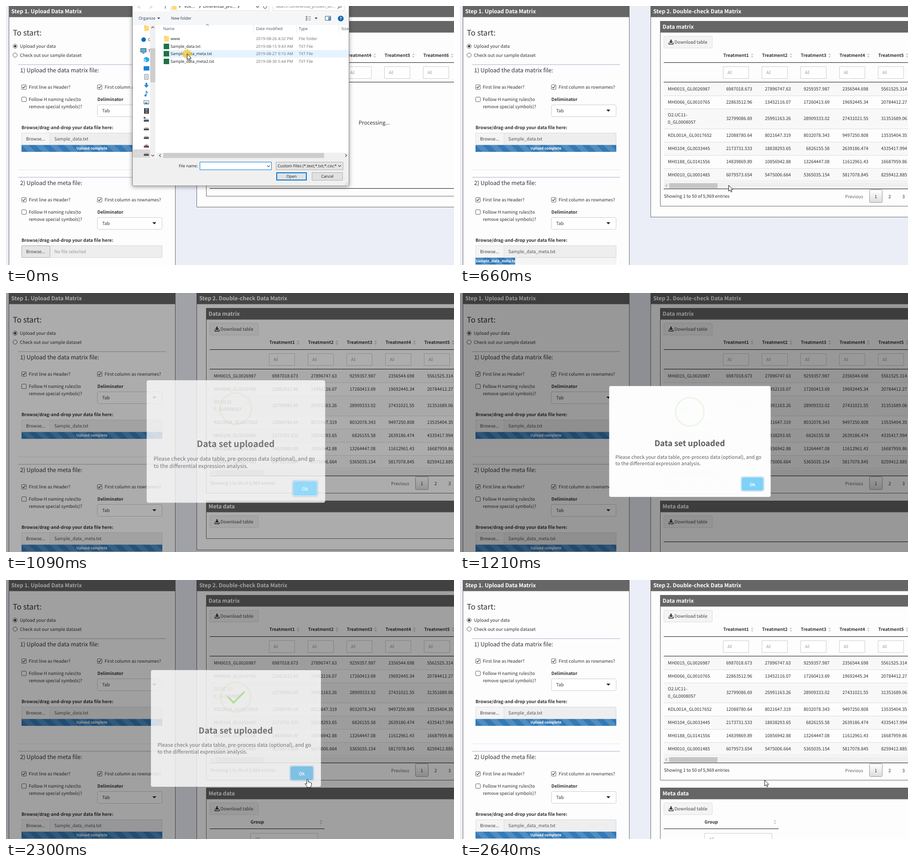
These frames come from a looping animation (983x570 px, 2.73 s). An HTML page with a canvas:

```html
<!DOCTYPE html>
<html lang="en">
<head>
<meta charset="utf-8">
<title>Data upload</title>
<style>
html, body { margin: 0; width: 100%; height: 100%; overflow: hidden; background: #ebeef6; }
canvas { display: block; }
</style>
</head>
<body>
<canvas id="stage" width="983" height="570"></canvas>
<script>
const W = 983, H = 570, LOOP = 2730;
const c = document.getElementById('stage').getContext('2d');
const SANS = '"Noto Sans CJK JP", "Noto Sans CJK SC", "Noto Sans CJK KR", "Noto Sans", sans-serif';
const UI = '"Open Sans", "Noto Sans", sans-serif';
const BODY = 9.8, BOLD = 9.72, TITLE = 11.9;
const BAR = '#666', INK = '#333', PAGE = '#ebeef6', BLUE = '#0078d7';

// The picture only changes at these moments.
const STEPS = [0, 100, 210, 330, 540, 660, 760, 870, 990, 1090, 1210, 1310,
  1430, 1550, 1650, 1760, 1870, 2300, 2410, 2520, 2640];

// time, x, y, shape
const POINTER = [
  [0, 397, 105, 'arrow'], [540, 500, 260, 'arrow'], [660, 589, 394, 'arrow'],
  [760, 650, 455, 'arrow'], [870, 705, 520, 'arrow'], [990, 0, 0, ''],
  [1650, 758, 522, 'arrow'], [1760, 706, 480, 'arrow'],
  [1870, 661, 438, 'hand'], [2640, 668, 440, 'arrow']
];

// time, shade, modal opacity, modal scale
const MODAL = [
  [0, 0, 0, 1], [1090, .32, .78, 1.05], [1210, .4, .98, .95], [1310, .4, 1, 1],
  [2300, .37, .8, 1], [2410, .3, .42, 1], [2520, .1, .08, 1], [2640, 0, 0, 1]
];

const ROWS = [
  ['MH0015_GL0026987', '6987018.673 27896747.63 9259357.987 2356544.698 5561525.314'],
  ['MH0066_GL0010765', '22863512.96 13452116.07 17260413.69 19692445.34 20784412.27'],
  ['O2.UC11-|0_GL0008057', '32799086.69 25991163.26 28909333.02 27431021.55 31351689.06'],
  ['KDL001A_GL0017652', '12088780.64 8021647.319 8032078.343 9497250.808 13535404.35'],
  ['MH0104_GL0033445', '2173731.533 18838293.65 6826155.58 2639186.474 4335417.994'],
  ['MH0188_GL0141556', '14839869.89 10856942.88 13264447.08 11612961.43 16687959.86'],
  ['MH0010_GL0001485', '6079573.654 5475006.664 5365035.154 5817078.845 8259412.885']
];

const latest = (list, t) => list.filter(k => k[0] <= t).pop();

// Baselines sit on whole pixels so that glyphs stay crisp.
function text(s, x, y, { size = BODY, bold = false, color = INK, align = 'left', font = SANS } = {}) {
  c.font = `${bold ? 700 : 400} ${size}px ${font}`;
  c.textAlign = align;
  c.fillStyle = color;
  c.fillText(s, x, Math.round(y));
}

function rect(x, y, w, h, fill) {
  c.fillStyle = fill;
  c.fillRect(x, y, w, h);
}

function box(x, y, w, h, fill, stroke, r = 0, line = 1) {
  c.beginPath();
  c.roundRect(x + line / 2, y + line / 2, w - line, h - line, r);
  c.fillStyle = fill;
  c.fill();
  if (stroke) {
    c.strokeStyle = stroke;
    c.lineWidth = line;
    c.stroke();
  }
}

function shape(points, fill, stroke, line = 1) {
  c.beginPath();
  points.forEach(([x, y]) => c.lineTo(x, y));
  c.closePath();
  if (fill) { c.fillStyle = fill; c.fill(); }
  if (stroke) { c.strokeStyle = stroke; c.lineWidth = line; c.stroke(); }
}

function path(points, color, line = 1) {
  c.beginPath();
  points.forEach(([x, y]) => c.lineTo(x, y));
  c.strokeStyle = color;
  c.lineWidth = line;
  c.stroke();
}

function disc(x, y, r, fill, stroke, line = 1) {
  c.beginPath();
  c.arc(x, y, r, 0, 7);
  if (fill) { c.fillStyle = fill; c.fill(); }
  if (stroke) { c.strokeStyle = stroke; c.lineWidth = line; c.stroke(); }
}

function clipped(x, y, w, h, draw) {
  c.save();
  c.beginPath();
  c.rect(x, y, w, h);
  c.clip();
  draw();
  c.restore();
}

const down = (x, y, w, h, color) => shape([[x - w, y], [x + w, y], [x, y + h]], color);
const chevron = (x, y, dx, dy, color = '#444') =>
  path(dx ? [[x - dx, y - 3], [x + dx, y], [x - dx, y + 3]] : [[x - 3, y - dy], [x, y + dy], [x + 3, y - dy]], color, 1.1);

function panelHead(x, y, w, h, title, base) {
  rect(x, y, w, h, BAR);
  text(title, x + 5.5, base, { size: TITLE, bold: true, color: '#fff' });
}

// ---- left panel ----

function radio(y, label, on) {
  disc(20, y, 4.6, '#fff', '#555');
  if (on) disc(20, y, 2.5, '#333');
  text(label, 30.5, y + 3.5);
}

function checkbox(x, y, on) {
  box(x, y - 5, 11, 11, '#fff', '#666', 1.5);
  if (on) path([[x + 2.5, y + .5], [x + 4.6, y + 2.8], [x + 8.6, y - 2.3]], '#333', 1.3);
}

function progress(y, share, label) {
  const x = 34, w = 309 * share, h = 15, tile = 31.2;
  rect(x, y, 309, h, '#f5f5f5');
  clipped(x, y, w, h, () => {
    rect(x, y, w, h, '#337ab7');
    for (let s = x - tile; s < x + w; s += tile)
      shape([[s, y], [s + tile / 2, y], [s + tile / 2 + h, y + h], [s + h, y + h]], 'rgba(255,255,255,.15)');
    const full = share === 1;
    text(label, full ? x + w / 2 : x, y + 10,
      { size: 8.1, bold: true, color: '#fff', align: full ? 'center' : 'left' });
  });
}

function uploadForm(top, title, file, pressed) {
  rect(27, top, 324, 2, '#d2d2e3');
  text(title, 31, top + 18, { size: 12.6 });
  checkbox(34, top + 50, true);
  text('First line as Header?', 50, top + 54);
  checkbox(200, top + 50, true);
  text('First column as rownames?', 216.5, top + 54);
  checkbox(34, top + 77, false);
  text('Follow H naming rules(to', 50, top + 81);
  text('remove special symbols)?', 50, top + 97);
  text('Deliminator', 200.5, top + 81, { size: BOLD, bold: true });
  box(200, top + 89, 143, 27, '#fff', '#ccc', 3);
  text('Tab', 211, top + 106);
  down(325.5, top + 100, 4.3, 4.6, '#222');
  text('Browse/drag-and-drop your data file here:', 34, top + 143, { size: BOLD, bold: true });
  box(34, top + 151, 309, 27, '#eee', '#d2d6de');
  box(34, top + 151, 63, 27, pressed ? '#e5e5e5' : '#f4f4f4', pressed ? '#aaa' : '#ddd', 2);
  text('Browse...', 44, top + 168, { color: '#444' });
  text(file, 106, top + 168, { color: file[0] === 'N' ? '#999' : '#555' });
}

function leftPanel(t) {
  box(6, -2, 366, H + 6, '#fdfdfe', BAR);
  panelHead(6, 0, 365.5, 24.5, 'Step 1. Upload Data Matrix', 16);
  text('To start:', 15, 65, { size: 16.75 });
  radio(88.5, 'Upload your data', true);
  radio(108, 'Check out our sample dataset', false);
  uploadForm(128, '1) Upload the data matrix file:', 'Sample_data.txt', false);
  progress(306, 1, 'Upload complete');
  rect(27, 360, 324, 1, '#e6e6e6');
  const picked = t >= 330;
  uploadForm(376, '2) Upload the meta file:', picked ? 'Sample_data_meta.txt' : 'No file selected', !picked);
  if (t >= 760) progress(554, 1, 'Upload complete');
  else if (picked) progress(554, t >= 660 ? .282 : 0, 'Sample_data_meta.txt');
}

// ---- right panel ----

function sortMark(x, y) {
  shape([[x - 3, y - 1.2], [x + 3, y - 1.2], [x, y - 5]], '#ccc');
  shape([[x - 3, y + 1.2], [x + 3, y + 1.2], [x, y + 5]], '#ccc');
}

function downloadButton(y) {
  box(447, y, 107, 27, '#f4f4f4', '#ddd', 2);
  shape([[461.5, y + 8], [464.5, y + 8], [464.5, y + 12], [467.5, y + 12],
    [463, y + 16.3], [458.5, y + 12], [461.5, y + 12]], INK);
  path([[458.6, y + 14.5], [458.6, y + 18], [467.6, y + 18], [467.6, y + 14.5]], INK, 1.7);
  text('Download table', 470.5, y + 17, { color: '#444' });
}

function filterBox(x, y, w) {
  box(x, y, w, 27, '#fff', '#ccc');
  clipped(x, y, w > 100 ? w : 20, 27, () => text('All', x + 10, y + 17, { color: '#999' }));
}

function columns(first) {
  for (let i = 0; i < 6; i++) {
    const x = first + 85 * i;
    text('Treatment' + (i + 1), x + .8, 112, { size: BOLD, bold: true });
    sortMark(x + 64, 109);
    filterBox(x, 133, 57);
  }
  rect(447, 124, W, 1, '#111');
  rect(447, 167, W, 1, '#111');
}

function dataRows() {
  let y = 168;
  ROWS.forEach(([id, values], i) => {
    const lines = id.split('|'), h = lines.length > 1 ? 44.3 : 28.9, base = y + h / 2 + 3.3;
    if (i % 2 === 0) rect(447, Math.round(y), W, Math.round(h), '#f8f8f8');
    if (i) rect(447, Math.round(y), W, 1, '#ddd');
    lines.forEach((s, k) => text(s, 456, base + (k - (lines.length - 1) / 2) * 15.6));
    values.split(' ').forEach((v, k) => text(v, 641 + 85 * k, base, { align: 'right' }));
    y += h;
  });
  rect(447, 385, W, 1, '#ddd');
  rect(447, 388, W, 14, '#f0f0f0');
  rect(459, 390, 106, 11, '#c6c6c6');
  chevron(453, 395.5, -1.5, 0, '#999');
  rect(447, 402, W, 1, '#111');
  text('Showing 1 to 50 of 5,969 entries', 447.5, 422);
  text('Previous', 845, 423, { color: '#666' });
  const shade = c.createLinearGradient(0, 405, 0, 433);
  shade.addColorStop(0, '#fff');
  shade.addColorStop(1, '#dcdcdc');
  box(898, 404, 29, 29, shade, '#979797', 2);
  ['1', '2', '3'].forEach((s, i) => text(s, 912.5 + 30.3 * i, 423, { align: 'center' }));
}

function metaPanel(t) {
  const bottom = t < 1210 ? 541 : H + 4;
  box(439, 457, W, bottom - 457, '#fdfdfe', BAR);
  panelHead(439, 457, W, 25.5, 'Meta data', 473.5);
  downloadButton(490);
  if (t < 1210) return;
  const wide = t < 1430;
  rect(447, 547, wide ? W : 252, 1, '#111');
  if (wide) return;
  text('Group', 536.5, 536, { size: BOLD, bold: true });
  sortMark(691, 533);
  filterBox(536, 557, 149);
}

function rightPanel(t) {
  const loaded = t >= 210, meta = t >= 1090;
  const outer = !loaded ? 443 : !meta ? 465 : t < 1210 ? 566 : H + 6;
  box(418, -2, W, outer + 2, '#fdfdfe', BAR);
  panelHead(418.5, 0, W, 24.5, 'Step 2. Double-check Data Matrix', 16);
  box(439, 33, W, loaded ? 408 : 386, '#fdfdfe', BAR);
  panelHead(439, 33, W, 25.5, 'Data matrix', 49.5);
  downloadButton(66);
  columns(loaded ? 577 : 490);
  if (loaded) dataRows();
  else {
    text('Processing...', 808, 261, { size: 11.7, align: 'center' });
    rect(447, 401, W, 1, '#111');
  }
  if (meta) metaPanel(t);
}

// ---- file dialog ----

const ui = (s, x, y, color = '#1a1a1a', align = 'left') =>
  text(s, x, y, { size: 8.8, color, align, font: UI });

function folder(x, y) {
  rect(x, y - 6, 5, 3, '#e8b83f');
  rect(x, y - 5, 10.5, 11, '#ffd977');
}

function drive(x, y) {
  shape([[x - 4, y - 3], [x + 4, y - 3], [x + 5.5, y], [x - 5.5, y]], '#b9b9b9');
  rect(x - 5.5, y, 11, 3.5, '#444');
}

function navPane() {
  rect(278, 42, 38, 292, '#fff');
  rect(278, 315.5, 38, 18.5, '#d9d9d9');
  folder(303, 49);
  disc(302, 74, 5, '#0a6cc4');
  clipped(310, 60, 6, 50, () => { ui('C', 312, 77); ui('T', 312, 101.5); });
  box(295, 93, 13, 9, '#4fb3ee', '#444');
  rect(299, 103, 5, 1.5, '#555');
  shape([[302, 115], [308, 112], [314, 115], [314, 121], [308, 124], [302, 121]], '#2aa7df');
  shape([[302, 115], [308, 118], [308, 124], [302, 121]], '#7fd0f2');
  rect(302, 132.5, 12.5, 9.5, '#1583d8');
  box(303.5, 150, 9, 12, '#fff', '#777');
  for (let i = 0; i < 3; i++) rect(305.5, 153 + 2.5 * i, 5, 1, '#6a9cc4');
  shape([[306, 169], [310, 169], [310, 174], [313.5, 174], [308, 180], [302.5, 174], [306, 174]], '#2b86d6');
  disc(306, 197, 2.3, '#1583d8');
  path([[307.6, 197], [307.6, 187.5], [311.5, 191.5]], '#1583d8', 1.5);
  box(302, 207.5, 12, 9, '#dff0fa', '#777');
  shape([[303, 215.5], [307, 211.5], [313, 215.5]], '#3f7f9f');
  rect(303, 225, 10.5, 12, '#333');
  rect(305.5, 226, 5.5, 4.5, '#5a9bd0');
  rect(305.5, 231.5, 5.5, 4.5, '#b06a4a');
  rect(302, 244, 4, 4, '#1583d8');
  [251, 270, 289, 308, 326].forEach(y => drive(308, y));
  path([[304, 310], [310, 305]], '#c0392b', 1.2);
  rect(316, 42, 12, 292, '#f0f0f0');
  rect(316.5, 93, 11, 75, '#cdcdcd');
  chevron(322, 47, 0, -1.5);
  chevron(322, 329, 0, 1.5);
}

function addressBar() {
  path([[296, -1], [289, 2], [296, 5]], '#bbb');
  path([[314, -1], [321, 2], [314, 5]], '#bbb');
  path([[349.5, 6], [349.5, -3]], '#555', 1.2);
  box(361, -12, 217, 23, '#fff', '#d9d9d9');
  folder(364, 2);
  ui('«', 379, 4);
  ui('Volc...', 391, 4);
  chevron(425, 1.5, 1.5, 0);
  ui('Differential_pro...', 432.5, 4);
  chevron(510, 1.5, 1.5, 0);
  chevron(552, 2, 0, 1.5);
  disc(568.5, 1.5, 3.6, null, '#555', 1.1);
  box(585, -12, 158, 23, '#fff', '#d9d9d9');
  ui('Search Differential_protein_an...', 592, 4, '#777');
  disc(733, 0, 3, null, '#666', 1.1);
  path([[731, 2.5], [728, 6]], '#666', 1.3);
}

function toolbar() {
  ui('Organize', 291, 30, '#1e395b');
  down(335, 25.5, 3.2, 3.4, '#1e395b');
  ui('New folder', 362, 30, '#1e395b');
  for (let i = 0; i < 3; i++) {
    rect(657.5, 22.5 + 3.6 * i, 4, 2, '#777');
    rect(663.5, 23 + 3.6 * i, 5.5, 1, '#777');
  }
  down(680.5, 25.5, 3.2, 3.4, '#333');
  box(700, 22, 13, 10, '#fff', '#456');
  rect(707, 24, 5, 7, '#4f9fe0');
  disc(734.5, 27.5, 6.3, '#0a64b4');
  text('?', 734.5, 31, { size: 9.5, bold: true, color: '#fff', align: 'center', font: UI });
}

function fileList(selected) {
  rect(328, 42, 424, 294, '#fff');
  [['Name', 345], ['Date modified', 548.5], ['Type', 642.5], ['Size', 736]]
    .forEach(([s, x]) => ui(s, x, 53, '#44546a'));
  [543, 637, 730].forEach(x => rect(x, 42, 1, 18, '#e5e5e5'));
  chevron(442, 41.5, 0, -1.3, '#777');
  rect(343, 97, 409, 16.5, selected ? '#cce8ff' : '#e5f3ff');
  [['www', '2019-08-26 4:32 PM', 'File folder'],
   ['Sample_data.txt', '2019-08-15 9:43 AM', 'TXT File'],
   ['Sample_data_meta.txt', '2019-08-27 9:10 AM', 'TXT File'],
   ['Sample_data_meta2.txt', '2019-08-30 5:44 PM', 'TXT File']].forEach(([name, date, type], i) => {
    const y = Math.round(72.3 + 16.4 * i);
    if (i) rect(346, y - 6, 12, 12, '#1f7246');
    else folder(347, y);
    ui(name, 361, y + 3);
    ui(date, 548.5, y + 3, '#6d6d6d');
    ui(type, 642.5, y + 3, '#6d6d6d');
  });
  rect(330, 323, 422, 12, '#f0f0f0');
  rect(345, 323.5, 353, 11, '#cdcdcd');
  chevron(338, 329, -1.5, 0);
  chevron(746, 329, 1.5, 0);
}

function dialogFoot(selected) {
  rect(278, 335, 474, 60, '#f0f0f0');
  ui('File name:', 421, 355, '#1a1a1a', 'right');
  box(425, 343, 158, 18, '#fff', BLUE);
  if (selected) ui('Sample_data_meta.txt', 429, 355);
  chevron(576, 352.5, 0, 1.5);
  box(592, 343, 148, 18, '#e4e4e4', '#adadad');
  clipped(592, 343, 133, 18, () => ui('Custom Files (*.text;*.txt;*.csv;*.', 596, 355));
  chevron(732, 352, 0, 1.5);
  box(593, 366, 67, 18, '#e1e1e1', BLUE, 0, 2);
  ui('Open', 626.5, 378, '#1a1a1a', 'center');
  box(671, 366, 68, 18, '#e1e1e1', '#adadad');
  ui('Cancel', 705, 378, '#1a1a1a', 'center');
  for (let i = 0; i < 3; i++)
    for (let j = 0; j <= i; j++) rect(749 - 2.5 * j, 387 + 2.5 * i, 1.2, 1.2, '#aaa');
}

function fileDialog(selected) {
  c.save();
  c.shadowColor = 'rgba(0,0,0,.4)';
  c.shadowBlur = 9;
  c.shadowOffsetY = 2;
  rect(277, -20, 476, 415.5, '#8a8a8a');
  c.restore();
  rect(278, -20, 474, 414.5, '#f5f6f7');
  rect(278, 0, 474, 12, '#fff');
  addressBar();
  toolbar();
  navPane();
  fileList(selected);
  dialogFoot(selected);
  disc(397, 105.5, 10, 'rgba(243,203,50,.75)');
}

// ---- message ----

function tween(keys, p) {
  const i = keys.findIndex(k => k[0] > p);
  if (i === 0) return keys[0].slice(1);
  if (i < 0) return keys[keys.length - 1].slice(1);
  const a = keys[i - 1], b = keys[i], f = (p - a[0]) / (b[0] - a[0]);
  return a.slice(1).map((v, k) => v + (b[k + 1] - v) * f);
}

// keys hold time share, left, top, length in an 80 unit icon
function tickBar(keys, p, angle) {
  const [x, y, w] = tween(keys, p);
  if (w < 1) return;
  c.save();
  c.translate(472.8, 226.8);
  c.scale(.78, .78);
  c.translate(x + w / 2, y + 2.5);
  c.rotate(angle);
  box(-w / 2, -2.5, w, 5, '#a5dc86', null, 2, 0);
  c.restore();
}

function okButton(pressed) {
  box(621.7, 407.7, 54.6, 35, 'rgba(43,114,165,.29)', null, 5, 0);
  box(623.2, 409.2, 51.6, 32, '#fff', null, 4, 0);
  box(624, 410, 50, 30.4, pressed ? '#62b4e0' : '#7cd1f9', null, 4, 0);
  text('Ok', 649, 430, { size: 9.75, bold: true, color: '#fff', align: 'center' });
}

function message(t) {
  const [, shade, alpha, scale] = latest(MODAL, t);
  if (!shade) return;
  rect(0, 0, W, H, `rgba(0,0,0,${shade})`);
  c.save();
  c.globalAlpha = alpha;
  c.translate(504.4, 326.7);
  c.scale(scale, scale);
  c.translate(-504.4, -326.7);
  box(318, 198.3, 373, 256.8, '#fff', null, 4, 0);
  disc(504.2, 258, 32.8, null, 'rgba(165,220,134,.22)', 3.1);
  const p = (t - 1100) / 750;
  tickBar([[.54, 1, 19, 0], [.7, -8, 37, 50], [.84, 21, 48, 17], [1, 14, 45, 25]], p, Math.PI / 4);
  tickBar([[.65, 34, 54, 0], [.84, 25, 35, 55], [1, 25, 38, 47]], p, -Math.PI / 4);
  text('Data set uploaded', 504, 338, { size: 18.35, bold: true, color: 'rgba(0,0,0,.65)', align: 'center' });
  const grey = { size: 11.22, color: 'rgba(0,0,0,.64)' };
  text('Please check your data table, pre-process data (optional), and go', 332.5, 367, grey);
  text('to the differential expression analysis.', 332.5, 382, grey);
  okButton(t >= 2300);
  c.restore();
}

// ---- pointer ----

const CURSORS = {
  arrow: [[0, 0], [0, 13], [3, 10.3], [5.2, 15], [7.2, 14], [5.2, 9.6], [9, 9.4]],
  hand: [[-1.6, 11], [-1.6, 1.3], [-.6, .3], [.6, .3], [1.6, 1.3], [1.6, 6], [4, 6], [4.5, 7], [6.6, 7],
    [7.2, 8], [9, 8.6], [9, 13], [7, 16.5], [7, 18], [-1, 18], [-1, 16], [-5, 11], [-4.7, 9.6], [-3.4, 9.3]]
};

function pointer(t) {
  const [, x, y, kind] = latest(POINTER, t);
  if (!kind) return;
  c.save();
  c.translate(x + .5, y + .5);
  shape(CURSORS[kind], '#fff', '#111');
  c.restore();
}

function frame(now) {
  const t = STEPS.filter(s => s <= now % LOOP).pop();
  c.textRendering = 'geometricPrecision';
  rect(0, 0, W, H, PAGE);
  leftPanel(t);
  rightPanel(t);
  if (t < 210) fileDialog(t >= 100);
  message(t);
  pointer(t);
}

const start = performance.now();
function tick() {
  frame(Math.max(0, performance.now() - start));
  requestAnimationFrame(tick);
}
tick();
</script>
</body>
</html>
```
